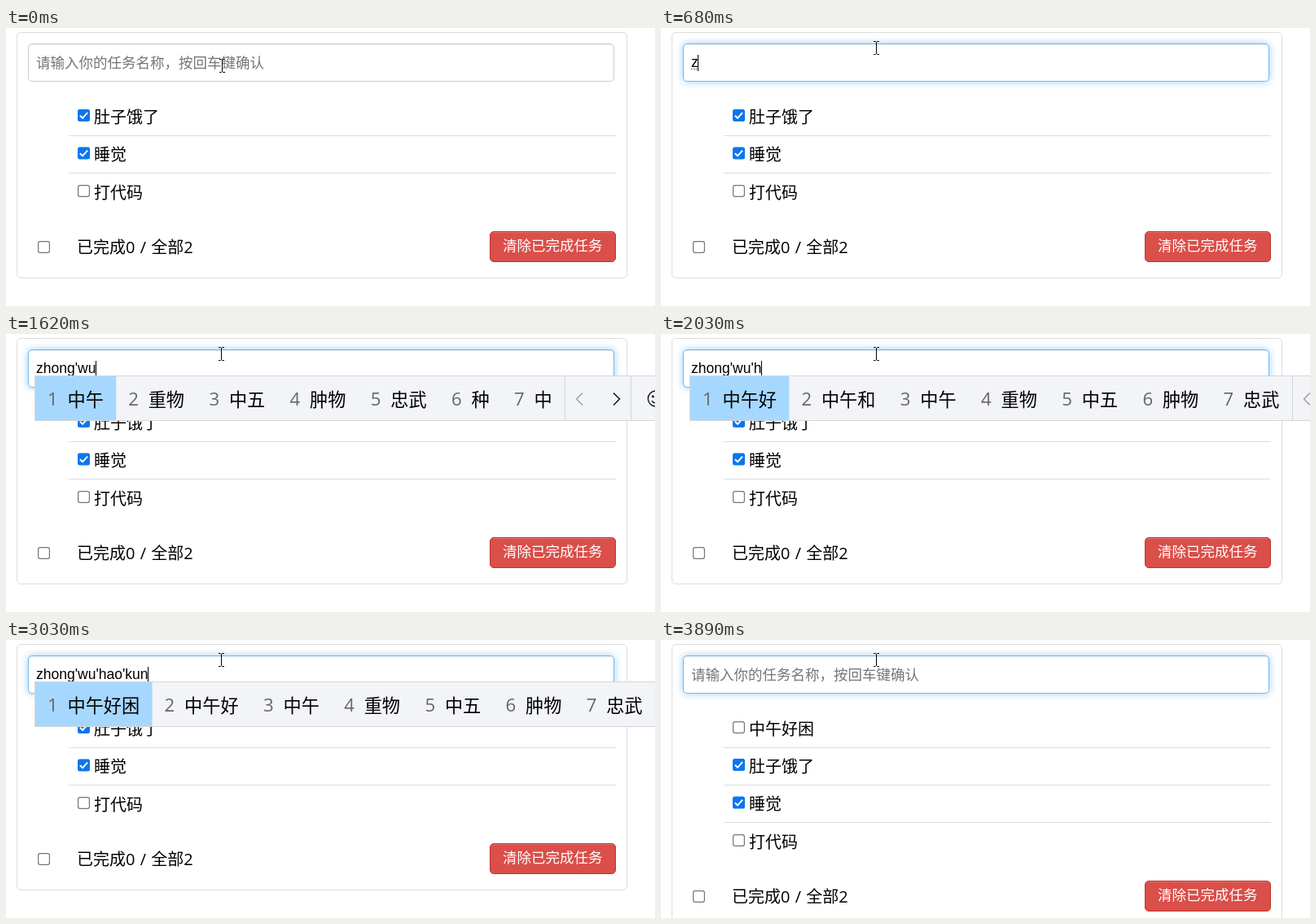
An HTML page that plays this animation: 797 px wide and 342 px high, repeating every 4160 ms.

```html
<!DOCTYPE html>
<html lang="zh-CN">
<head>
<meta charset="utf-8">
<title>任务列表</title>
<style>
  html, body { margin: 0; width: 100%; height: 100%; overflow: hidden; background: #fff; }
  #stage { position: relative; width: 797px; height: 342px; overflow: hidden; }
  #panel, #field { position: absolute; box-sizing: border-box; border-radius: 5px; }
  #panel { left: 13px; top: 5px; width: 750px; height: 303px; border: 1px solid #ddd; }
  #field { left: 27px; top: 19px; width: 720px; height: 47px; border: 1px solid #ccc; background: #fff; }
  svg { position: absolute; left: 0; top: 0; }
  text { font: 20px 'Open Sans', 'Noto Sans CJK SC', 'Noto Sans CJK', sans-serif; white-space: pre; }
  text.ui { font-size: 17.5px; }
  text.typed { font: 17.5px 'Liberation Sans', 'Noto Sans CJK SC', 'Noto Sans CJK', sans-serif; }
  text.word { font-size: 22.2px; }
</style>
</head>
<body>
<div id="stage">
  <div id="panel"></div>
  <div id="field"></div>
  <svg id="svg" width="797" height="342" viewBox="0 0 797 342"></svg>
</div>
<script>
const LOOP = 4160, ADDED = 3560, ROW = 46;
const NS = 'http://www.w3.org/2000/svg';
const byId = id => document.getElementById(id);
const svg = byId('svg'), panel = byId('panel'), field = byId('field');

function add(parent, tag, attrs = {}, content) {
  const el = document.createElementNS(NS, tag);
  for (const k in attrs) el.setAttribute(k, attrs[k]);
  if (content) el.textContent = content;
  return parent.appendChild(el);
}
const show = (el, on) => { el.style.display = on ? '' : 'none'; };
const line = (g, d, stroke, width = 1) =>
  add(g, 'path', { d, stroke, 'stroke-width': width, fill: 'none' });

function checkbox(g, x, y, on) {
  add(g, 'rect', on
    ? { x: x - 7.5, y: y - 7.5, width: 15, height: 15, rx: 2.5, fill: '#0b76ef' }
    : { x: x - 6.9, y: y - 6.9, width: 13.8, height: 13.8, rx: 2.3, fill: '#fff', stroke: '#767676', 'stroke-width': 1.2 });
  if (on) line(g, `M${x - 4.6} ${y + .2}l3.2 3.2l6 -6.8`, '#fff', 2);
}

function task(g, y, label, on, ruled) {
  checkbox(g, 95.5, y - 1.5, on);
  add(g, 'text', { x: 108, y: y + 7.5 }, label);
  if (ruled) line(g, `M77 ${Math.round(y + 23) + .5}H749`, '#ddd');
}

// List and footer
const list = add(svg, 'g'), fresh = add(svg, 'g');
task(fresh, 109, '中午好困', false, true);
task(list, 109, '肚子饿了', true, true);
task(list, 155.5, '睡觉', true, false);
line(list, 'M77 178.5H749', '#ddd');
task(list, 202, '打代码', false, false);
checkbox(list, 46.5, 269.5, false);
add(list, 'text', { x: 87, y: 277, style: 'word-spacing:1px' }, '已完成0 / 全部2');
add(list, 'rect', { x: 594.5, y: 250.5, width: 154, height: 37, rx: 4.5, fill: '#da4f49', stroke: '#bd362f' });
line(list, 'M598 251.5H745', 'rgba(255,255,255,.2)');
add(list, 'text', { x: 610, y: 274, class: 'ui', fill: '#fff' }, '清除已完成任务');

// Field content
const hint = add(svg, 'text', { x: 37, y: 48.5, class: 'ui', fill: '#757575' }, '请输入你的任务名称，按回车键确认');
const typed = add(svg, 'text', { x: 37, class: 'typed' });
const under = add(svg, 'path', { stroke: '#222', 'stroke-dasharray': '1 1' });
const caret = add(svg, 'rect', { y: 33, width: 1, height: 20 });

// Candidate bar
const bar = add(svg, 'g');
const cursor = add(svg, 'g');
line(cursor, 'M-3.5 -7.5h2.5l1 1l1 -1h2.5M0 -7V7.5M-3.5 8.5h2.5l1 -1l1 1h2.5', '#000');

function fillBar(words) {
  bar.replaceChildren();
  if (!words) return;
  const cells = words.split(' ');
  const size = w => 54.8 + 22.2 * w.length;
  const end = Math.round(cells.reduce((x, w) => x + size(w), 36));
  add(bar, 'rect', { x: 35.5, y: 51.5, width: end + 107, height: 55, fill: '#f2f4f7', stroke: '#d3d6da' })
    .setAttribute('width', end + 142 - 35);
  add(bar, 'rect', { x: 36, y: 52, width: size(cells[0]), height: 54, fill: '#a6d8ff' });
  let x = 36;
  cells.forEach((w, i) => {
    add(bar, 'text', { x: x + 15, y: 88, class: 'word', fill: '#666' }, String(i + 1));
    add(bar, 'text', { x: x + 39.5, y: 88.5, class: 'word' }, w);
    x += size(w);
  });
  line(bar, `M${end + .5} 52V106M${end + 81.5} 52V106`, '#d3d6da');
  line(bar, `M${end + 22} 72.5l-7.5 7.5l7.5 7.5`, '#999', 1.3);
  line(bar, `M${end + 60} 72.5l7.5 7.5l-7.5 7.5`, '#111', 1.5);
  const face = add(bar, 'g', { transform: `translate(${end + 112} 79.5)` });
  add(face, 'circle', { r: 9.6, fill: 'none', stroke: '#111', 'stroke-width': 1.4 });
  for (const ex of [-3.5, 3.5]) add(face, 'circle', { cx: ex, cy: -2.5, r: 1.4 });
  line(face, 'M-5 2.8Q0 8.2 5 2.8', '#111', 1.4);
}

const Z = '在 中 这 自 做 再 最';
const ZHONG = '中 种 重 钟 忠 众 终';
const ZHONGW = '中午 中文 中외 中物 重物 种 中'.replace('中외', '中外');
const ZHONGWU = '中午 重物 中五 肿物 忠武 种 中';
const WUH = '中午好 中午和 中午 重物 中五 肿物 忠武';
const WUHAO = '中午好 中午号 中午毫 中午 重物 中五 肿物';
const tail = ' 中午好 中午 重物 中五 肿物 忠武';

// time, field text, candidates, caret visible
const STEPS = [
  [0, '', '', false],
  [70, '', '', true],
  [680, 'z', '', true],
  [750, 'z', Z, true],
  [950, 'zhon', ZHONG, true],
  [1350, 'zhong', ZHONG, true],
  [1480, "zhong'w", ZHONG, true],
  [1550, "zhong'wu", ZHONGW, true],
  [1620, "zhong'wu", ZHONGWU, true],
  [2030, "zhong'wu'h", WUH, true],
  [2170, "zhong'wu'hao", WUH, true],
  [2230, "zhong'wu'hao", WUHAO, true],
  [2630, "zhong'wu'hao'k", '中午好看' + tail, true],
  [2760, "zhong'wu'hao'ku", '中午好看' + tail, true],
  [2830, "zhong'wu'hao'ku", '中午好哭' + tail, true],
  [3030, "zhong'wu'hao'kun", '中午好困' + tail, true],
  [3360, '中午好困', '', true],
  [ADDED, '', '', true],
  [3890, '', '', false]
];
// time, focus amount, cursor x and y
const POINTER = [
  [0, 0, 265.5, 46],
  [70, .3, 265.5, 46],
  [140, .65, 265.5, 44],
  [210, 1, 265.5, 37],
  [280, 1, 264.5, 28],
  [350, 1, 264.5, 24]
];
const at = (table, t) => table.findLast(row => row[0] <= t);
const mix = (a, b, k) => Math.round(a + (b - a) * k);

function applyStep([t, text, words, caretOn]) {
  const latin = /^[a-z]/.test(text);
  typed.textContent = text;
  typed.setAttribute('y', latin ? 48 : 50.5);
  const end = text ? Math.round(36.5 + typed.getComputedTextLength()) : 37;
  caret.setAttribute('x', end);
  under.setAttribute('d', latin ? `M37 50.5H${end}` : '');
  show(under, latin && !words);
  show(caret, caretOn);
  show(hint, !text);
  fillBar(words);
  const added = t >= ADDED;
  show(fresh, added);
  list.setAttribute('transform', `translate(0 ${added ? ROW : 0})`);
  panel.style.height = 303 + (added ? ROW : 0) + 'px';
}

function applyPointer([, k, x, y]) {
  field.style.borderColor = `rgb(${mix(204, 117, k)},${mix(204, 185, k)},${mix(204, 240, k)})`;
  field.style.boxShadow = `inset 0 1px 1px rgba(0,0,0,.075), 0 0 ${10 * k}px rgba(82,168,236,${.6 * k})`;
  cursor.setAttribute('transform', `translate(${x} ${y})`);
}

let step, pointer;
const start = performance.now();
function draw() {
  const t = Math.max(0, performance.now() - start) % LOOP;
  const s = at(STEPS, t), p = at(POINTER, t);
  if (s !== step) applyStep(step = s);
  if (p !== pointer) applyPointer(pointer = p);
  requestAnimationFrame(draw);
}
draw();
</script>
</body>
</html>
```
